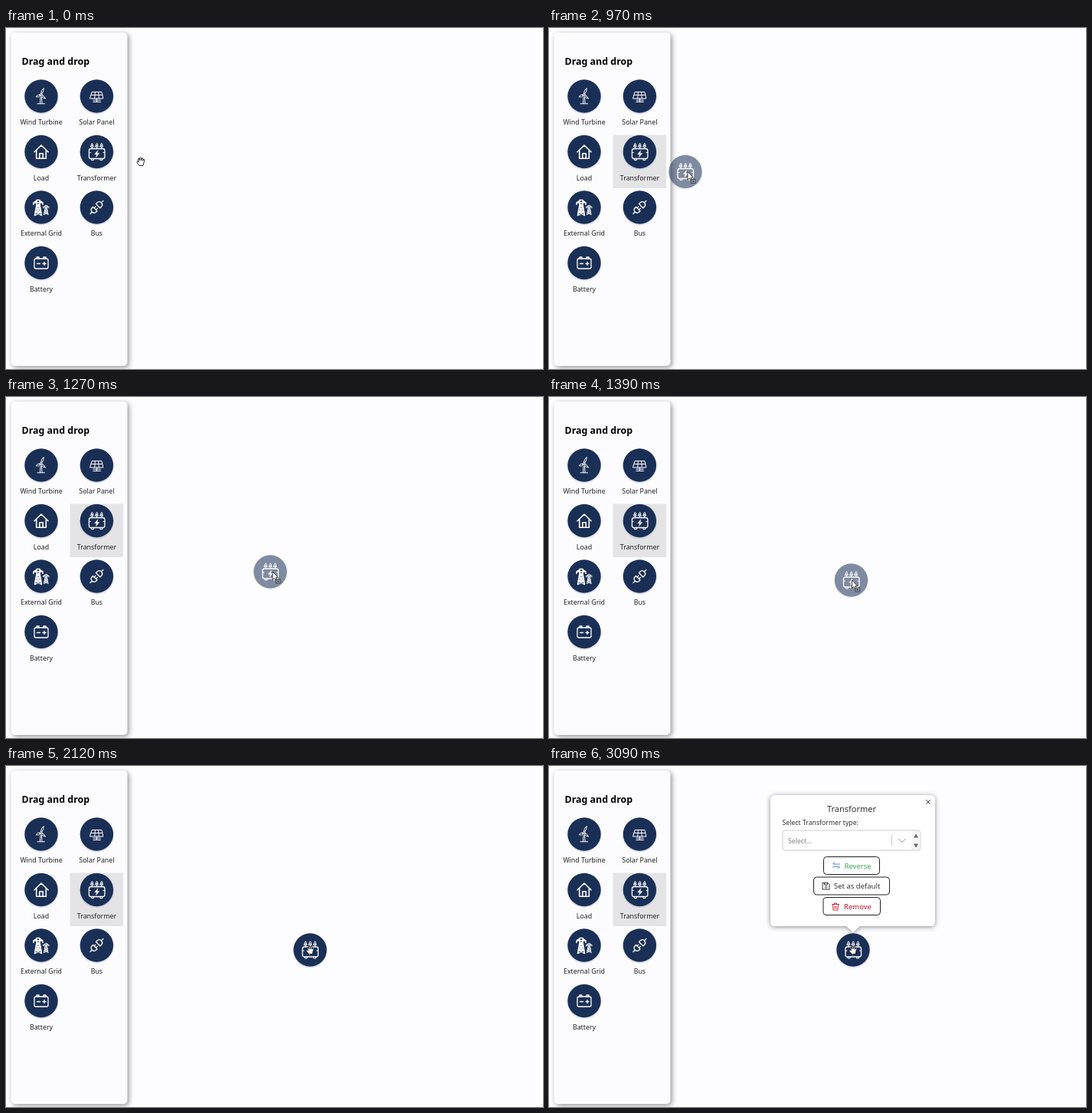
An HTML page that plays this animation: 701x445 px, repeating every 3120 ms.

```html
<!DOCTYPE html>
<html lang="en">
<head>
<meta charset="utf-8">
<title>Drag and drop</title>
<style>
html, body { margin: 0; width: 100%; height: 100%; overflow: hidden; background: #fdfcfe; }
svg { display: block; font-family: "Noto Sans", "Open Sans", sans-serif; }
.panel { fill: #fcfbfd; filter: drop-shadow(2px 2px 3px rgba(0,0,0,.42)); }
.icon { fill: none; stroke: #fff; stroke-width: 1.3; stroke-linecap: round; stroke-linejoin: round; }
.label { font-size: 8.8px; text-anchor: middle; fill: #222; }
.card { fill: #fff; filter: drop-shadow(0 1px 3px rgba(0,0,0,.45)); }
.button { fill: #fff; stroke: #222; }
.line { fill: none; stroke-linecap: round; stroke-linejoin: round; }
.action { font-size: 9.5px; }
</style>
</head>
<body>
<svg width="701" height="445" viewBox="0 0 701 445">
  <rect class="panel" x="6.5" y="6" width="152" height="435" rx="5"/>
  <text x="20.5" y="48" font-size="12.4" font-weight="700">Drag and drop</text>
  <rect id="hover" x="83.5" y="139.5" width="69.5" height="69.5" fill="#e4e3e6"/>
  <g id="palette"></g>

  <g id="popup">
    <path class="card" d="M295 38H498q6 0 6 6V203q0 6-6 6H406l-9 8-9-8H295q-6 0-6-6V44q0-6 6-6Z"/>
    <path class="line" d="M492.5 44.5l5 5m0-5l-5 5" stroke="#444"/>
    <text x="395" y="60" font-size="11" text-anchor="middle" fill="#333">Transformer</text>
    <text x="304.5" y="77" font-size="8.7" fill="#333">Select Transformer type:</text>
    <rect x="305" y="84" width="180" height="26" rx="3" fill="#fff" stroke="#ccc"/>
    <text x="312" y="101" font-size="8.7" fill="#808080">Select...</text>
    <path class="line" d="M447.5 90v14" stroke="#ccc"/>
    <path class="line" d="M457 95.5l4 4 4-4" stroke="#c4c4c4" stroke-width="1.5"/>
    <path d="M473.5 85h11v24h-11Z" fill="#f4f4f5"/>
    <path d="M476 93.5l3-5 3 5Zm0 8l3 5 3-5Z" fill="#666"/>

    <rect class="button" x="358.5" y="118.5" width="73" height="23" rx="4"/>
    <path class="line" d="M379.500 128h-9l2.500-2.500M370.500 131.500h9l-2.500 2.500" stroke="#5b8fd6"/>
    <text class="action" x="385.500" y="134" fill="#43a85a">Reverse</text>

    <rect class="button" x="345.5" y="145" width="99" height="23" rx="4"/>
    <path class="line" d="M357.500 152.500h6.500l2 2v6.500h-8.500Zm2 0v2.500h4v-2.500" stroke="#333"/>
    <circle cx="361.700" cy="158" r="1.300" fill="none" stroke="#333" stroke-width=".8"/>
    <text class="action" x="372" y="160" fill="#333">Set as default</text>

    <rect class="button" x="358" y="171.5" width="74.500" height="23" rx="4"/>
    <path class="line" d="M369.500 180.500h9m-6 0v-1.500h3v1.500m-5 0l.5 7.500h6l.5-7.500m-4.500 2.500v3m2-3v3" stroke="#c4162a" stroke-width=".9"/>
    <text class="action" x="385" y="187" fill="#c4162a">Remove</text>
  </g>

  <g id="node"></g>
  <g id="hand" fill="#fff" stroke="#111" stroke-width=".9" stroke-linejoin="round">
    <path d="M-2 5.500L-5 1.500Q-5.500 0-4-.3L-2.700.8-3.700-2.800Q-3.500-4.300-2.300-3.500L-1.400-1-1.500-4.500Q-.7-5.700.2-4.500L.5-1.200 1.200-4.200Q2.200-5 2.800-3.700L2.500-.7 3.500-2.500Q4.700-3 4.900-1.700L3.600 3 3 5.500Z"/>
  </g>
  <g id="arrow">
    <path d="M0 0V10.500L2.500 8.300 4 11.700 5.700 10.900 4.200 7.700H7.300Z" fill="#fff" stroke="#222" stroke-width=".8"/>
    <rect x="4.500" y="10" width="5.500" height="5" fill="#9aa3b3" stroke="#333" stroke-width=".8"/>
    <path d="M7.200 11.200v2.600m-1.300-1.300h2.600" stroke="#222" stroke-width=".7"/>
  </g>
</svg>
<script>
const LOOP = 3120, DROP = 1600;
const $ = id => document.getElementById(id);

const insulator = x => `M${x} -4v-2.500m-1.800 0h3.600l-.7-1.700h-2.200Zm.7-1.700q-.7-1.300 1.100-3 1.800 1.700 1.100 3`;
const pylon = (x, y, s) => `<path transform="translate(${x} ${y}) scale(${s})" stroke-width="1.500"
  d="M-4.500 20L-2 6V0H2V6L4.500 20M-2 1L-6 3.500V6M2 1L6 3.500V6M-6 3.500H6M-2 6H2L-3 11H3L-4 15.500H4L-4.500 20M-2 6L3 11M-3 11L4 15.500M-4 15.500L4.500 20"/>`;

const icons = {
  wind: `<g stroke-width="1"><circle cx="-.3" cy="-2" r="1.300"/>
    <path d="M-.5-3.500Q-.5-8 3.200-10.500 3.500-6 .8-3.200M-1.600-2Q-5-2.500-7 .8-3.500 2-1-.8M.8-1.300Q4.500-.5 5.500 3.200 1.500 2.500-.2-.5M-1 1L-1.500 9.500M.5 1.500L1 9.500M-5 9.800H4.500"/></g>`,
  solar: `<path stroke-width="1" d="M-6-5.500H6.500L8.500 3H-8.500ZM-7.200-1.500H7.400M-2-5.500L-2.700 3M2.300-5.500L2.900 3M0 3V7.500M-4.500 7.500H5M-4.500 5.200H5"/>`,
  house: `<path stroke-width="1.600" d="M-9 .3L0-8.500 9 .3M-6.300-1.700V8.700H6.300V-1.700M-2.200 8.500V2.200H2.200V8.500"/>`,
  transformer: `<rect x="-10" y="-4" width="20.500" height="13" rx="2.500"/>
    <path stroke-width="1" d="${[-6, .2, 6.400].map(insulator).join("")}M-7 9v2h3v-2M4.500 9v2h3v-2"/>
    <path fill="#fff" stroke-width=".5" d="M1.300-1.500L-2.700 3.200H0L-.8 7 3.300 2H.6Z"/>
    <path stroke-width="1" d="M-10 1h2M8.500 1h2"/>`,
  grid: pylon(-4, -9.500, 1) + pylon(6.300, -2.500, .6),
  bus: `<g transform="rotate(-45)"><path d="M-12 0H-8.500M-3-3.800H-5.500Q-8.500-3.300-8.500 0T-5.500 3.800H-3ZM-3-1.700H-.5M-3 1.700H-.5M12 0H8.500M2.500-3.800H5.500Q8.500-3.300 8.500 0T5.500 3.800H2.500Z"/></g>`,
  battery: `<rect x="-9" y="-5.500" width="18" height="13" rx="2"/>
    <path d="M-6-5.500v-2h3v2M3-5.500v-2h3v2M-5.500 1h4M2 1h4M4-1v4"/>`
};

const disc = name => `<circle cy="1.200" r="22.300" fill="#4870b0" opacity=".18"/>
  <circle r="21.700" fill="#1a2f55"/><g class="icon">${icons[name]}</g>`;

$("palette").innerHTML = [
  ["wind", "Wind Turbine"], ["solar", "Solar Panel"],
  ["house", "Load"], ["transformer", "Transformer"],
  ["grid", "External Grid"], ["bus", "Bus"],
  ["battery", "Battery"]
].map(([name, label], i) => `<g transform="translate(${46 + i % 2 * 72.400} ${89 + (i >> 1) * 72.500})">
  ${disc(name)}<text class="label" y="37.300">${label}</text></g>`).join("");
$("node").innerHTML = disc("transformer");

// Keys: time, ghost x, ghost y, pointer lead
const drag = [
  [760, 118.400, 161.500, 0], [880, 136, 170, 2], [970, 178, 187.500, 3],
  [1120, 265.500, 212.500, 5], [1150, 265.500, 212.500, 5],
  [1270, 345, 228, 3], [1390, 394.500, 239, 1]
];

function along(keys, t) {
  if (t <= keys[0][0]) return keys[0].slice(1);
  const i = keys.findIndex(k => k[0] > t);
  if (i < 0) return keys[keys.length - 1].slice(1);
  const a = keys[i - 1], b = keys[i], p = (t - a[0]) / (b[0] - a[0]);
  return a.slice(1).map((v, j) => v + (b[j + 1] - v) * p);
}

const clamp = v => Math.max(0, Math.min(1, v));
const place = (id, x, y) => $(id).setAttribute("transform", `translate(${x} ${y})`);
const fade = (id, o) => $(id).setAttribute("opacity", o);

function draw(now) {
  const raw = now % LOOP, phase = raw < 370 ? 0 : 10;
  const t = Math.floor((raw - phase) / 30) * 30 + phase;
  const dragging = t >= 760 && t < DROP, dropped = t >= DROP;

  const p = clamp(t / 360), ease = p * p * (3 - 2 * p);
  const handX = 176 - 58 * ease, handY = 174 - 14 * ease;
  const [x, y, lead] = along(drag, t);

  fade("hover", handX < 153 ? 1 : 0);
  fade("hand", dragging ? 0 : 1);
  place("hand", dropped ? 397 : handX, dropped ? 240 : handY);
  fade("arrow", dragging ? 1 : 0);
  place("arrow", x + lead, y);
  fade("node", dropped ? 1 : dragging ? .55 : 0);
  place("node", dropped ? 397 : x, dropped ? 240 : y);
  fade("popup", clamp((t - 2240) / 180));
}

function tick() {
  draw(performance.now());
  requestAnimationFrame(tick);
}
tick();
</script>
</body>
</html>
```
